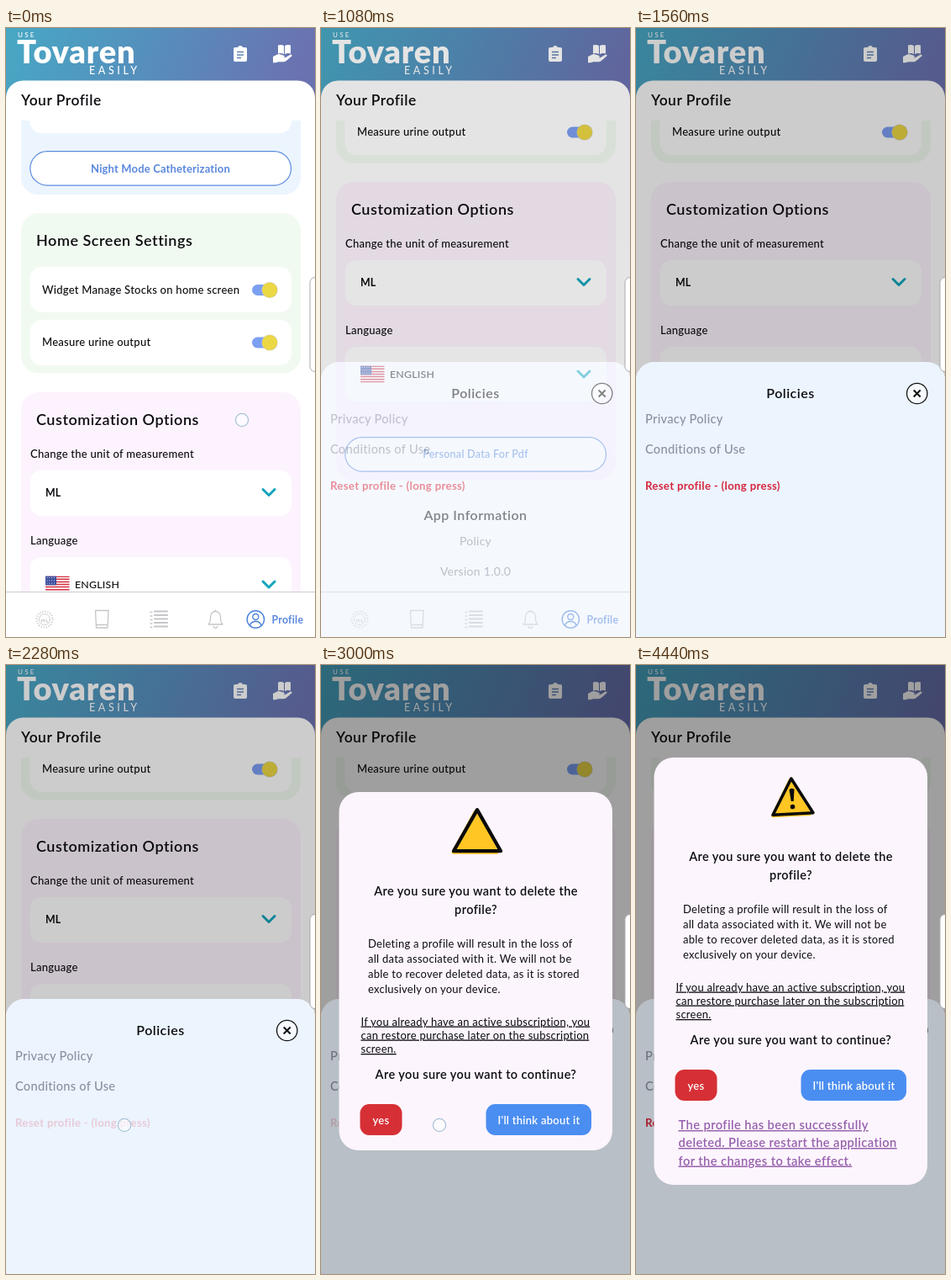
An HTML page that plays this animation: 368 px wide and 724 px high, repeating every 4.56 s.

```html
<!DOCTYPE html>
<html lang="en">
<head>
<meta charset="utf-8">
<title>Profile settings</title>
<style>
html, body { margin: 0; width: 100%; height: 100%; overflow: hidden; background: #fff; }
svg { display: block; width: 368px; height: 724px; }
text { font-family: Lato, "DejaVu Sans", sans-serif; font-size: 13px; font-weight: 500; letter-spacing: .02em; fill: #0c0c10; }
.mid { text-anchor: middle; }
.h1 { font-size: 17.4px; font-weight: 600; letter-spacing: .03em; }
.h2 { font-size: 18px; font-weight: 600; letter-spacing: .03em; }
.h3 { font-size: 16px; font-weight: 600; letter-spacing: .03em; }
.ask { font-size: 14.5px; font-weight: 600; letter-spacing: .028em; }
.grey { font-size: 14px; font-weight: 400; fill: #85858c; }
.item { font-size: 14.6px; fill: #8a90a0; }
.small { font-size: 12.3px; }
.bold { font-weight: 600; }
.heavy { font-weight: 700; }
.blue { fill: #5a88dd; }
.white { fill: #fff; }
.body { font-weight: 400; }
.link { font-weight: 400; text-decoration: underline; }
.done { font-size: 14.7px; font-weight: 600; letter-spacing: .028em; fill: #9560ab; text-decoration: underline; }
.reset { font-size: 13.2px; font-weight: 700; letter-spacing: .025em; fill: #d5263d; }
.line { fill: none; stroke: #c6c6ca; stroke-width: 1.3; stroke-linecap: round; stroke-linejoin: round; }
.outline { fill: #fff; stroke: #5a8bdc; stroke-width: 1.2; }
</style>
</head>
<body>
<svg viewBox="0 0 368 724">
  <defs>
    <linearGradient id="sky" x2="1" y2=".12">
      <stop offset="0" stop-color="#47a8c4"/>
      <stop offset=".5" stop-color="#568ebc"/>
      <stop offset="1" stop-color="#6b72b0"/>
    </linearGradient>
    <clipPath id="view"><rect y="110" width="368" height="560"/></clipPath>
    <clipPath id="flagBox"><rect x="47" y="651.5" width="28.5" height="20"/></clipPath>
    <g id="toggle">
      <rect x="-21" y="-6.5" width="27" height="13" rx="6.5" fill="#7c9ff2"/>
      <circle r="9.6" fill="#cdcbb8"/>
      <circle r="9" fill="#ecd744"/>
    </g>
    <path id="chevron" d="M-7-3.5 0 3.5 7-3.5" fill="none" stroke="#12a5bb" stroke-width="3" stroke-linecap="round" stroke-linejoin="round"/>
  </defs>

  <!-- header -->
  <rect width="368" height="110" fill="url(#sky)"/>
  <text class="white" x="14" y="10.5" style="font-size:8px;letter-spacing:2.3px">USE</text>
  <text class="white" x="13" y="42" style="font-size:38px;font-weight:900;letter-spacing:.02em">Tovaren</text>
  <text class="white" x="99" y="55" style="font-size:12.5px;letter-spacing:3.6px">EASILY</text>
  <g fill="#fff">
    <path d="M273 23h3a3.2 3.2 0 0 1 6 0h3a2 2 0 0 1 2 2v13a2 2 0 0 1-2 2h-12a2 2 0 0 1-2-2v-13a2 2 0 0 1 2-2Z"/>
    <path d="M275 28.5h8M275 32h8M275 35.5h5" stroke="#6383b5" stroke-width="1.5"/>
    <path d="M324 20.5q4-1.500 7 .7v10q-3-2-7-.7ZM332 21.200q3-2.200 7-.7v10q-4-1.300-7 .7Z"/>
    <path d="M318 34l5-2.500q2-1 4 0l4 1.200q2 1.500-.5 2.500h-4 6l6-3.500q2.500-.5 2 1.500l-7 6q-1.500 1-3 1h-6l-3.500 1h-3Z"/>
  </g>

  <path d="M0 724V83A20.500 20.500 0 0 1 20.500 62.500H347.500A20.500 20.500 0 0 1 368 83V724Z" fill="#fff"/>
  <text class="h1" x="18" y="91.500">Your Profile</text>

  <g clip-path="url(#view)"><g id="list">
    <rect x="18" y="40" width="333" height="158" rx="20" fill="#ecf5fe"/>
    <rect x="28.500" y="70" width="311.500" height="55" rx="14" fill="#fff"/>
    <rect class="outline" x="28.800" y="146.700" width="310.700" height="40.400" rx="20.200"/>
    <text class="mid heavy blue" x="184" y="171.500" style="letter-spacing:.012em">Night Mode Catheterization</text>

    <rect x="18" y="220" width="333" height="190.500" rx="21" fill="#f1faf0"/>
    <text class="h2" x="36" y="259">Home Screen Settings</text>
    <rect x="28.500" y="284" width="311.500" height="54" rx="14" fill="#fff"/>
    <rect x="28.500" y="347" width="311.500" height="54" rx="14" fill="#fff"/>
    <text x="43" y="315.500">Widget Manage Stocks on home screen</text>
    <text x="43" y="378">Measure urine output</text>
    <use href="#toggle" x="314" y="311.500"/>
    <use href="#toggle" x="314" y="374"/>

    <rect x="18" y="433" width="333" height="354.500" rx="21" fill="#fdf3fe"/>
    <text class="h2" x="36" y="472">Customization Options</text>
    <text x="29" y="510.500">Change the unit of measurement</text>
    <rect x="28.500" y="526" width="311.500" height="54" rx="14" fill="#fff"/>
    <text class="small heavy" x="47" y="557">ML</text>
    <use href="#chevron" x="313" y="552"/>
    <text x="29" y="614">Language</text>
    <rect x="28.500" y="629" width="311.500" height="65" rx="14" fill="#fff"/>
    <g clip-path="url(#flagBox)">
      <rect x="47" y="651.500" width="28.500" height="20" fill="#fff"/>
      <path id="stripes" stroke="#d22f3f" stroke-width="1.540"/>
      <rect x="47" y="651.500" width="13" height="10.800" fill="#3c4f9c"/>
      <path d="M48.500 653.500h11M48.500 656.800h11M48.500 660.100h11" stroke="#dfe4f5" stroke-width="1" stroke-dasharray="1 1.800"/>
    </g>
    <text class="small" x="82" y="666">ENGLISH</text>
    <use href="#chevron" x="313" y="661.500"/>
    <rect class="outline" x="28.800" y="736.700" width="310.700" height="40.400" rx="20.200"/>
    <text class="mid blue" x="184" y="761" style="font-size:12.6px">Personal Data For Pdf</text>

    <text class="mid h3" x="184" y="835">App Information</text>
    <text id="policy" class="mid grey" x="184" y="865">Policy</text>
    <text class="mid grey" x="184" y="901">Version 1.0.0</text>
  </g></g>

  <!-- tab bar -->
  <path d="M0 670.500H368" stroke="#cbcbcb"/>
  <g class="line">
    <circle cx="46" cy="703" r="9.500" stroke-width="2.200" stroke-dasharray="1 2" stroke-linecap="butt"/>
    <circle cx="46" cy="703" r="6.500" stroke-width=".8"/>
    <path d="M42.500 706v-3l1.500 1.500 1.500-1.500v3M48 703v3h2" stroke-width="1"/>
    <path d="M106.500 692.500h15.500l-1 20.500h-13.500ZM108 709.500h12" />
    <path d="M177 693.500h15M177 698h15M177 702.500h15M177 707h15M177 711.500h15" stroke-width="2.200"/>
    <path d="M172 694.500h2M172 699h2M172 703.500h2M172 708h2M172 712.500h2"/>
    <path d="M241 709q2.500-2.500 2.500-6v-3a6 6.500 0 0 1 12 0v3q0 3.500 2.500 6ZM247 711.500a2.600 2.600 0 0 0 5 0M249.500 693.500v-1.500"/>
  </g>
  <g fill="none" stroke="#4b82d8" stroke-width="1.400">
    <circle cx="297.300" cy="703" r="10.200"/>
    <circle cx="297.300" cy="700" r="3.500"/>
    <path d="M290.600 710q1.500-4.500 6.700-4.500t6.700 4.500"/>
  </g>
  <text class="small heavy blue" x="316.500" y="707.500">Profile</text>

  <!-- bottom sheet; the shade leaves the sheet itself free -->
  <g id="sheet">
    <path d="M0 0H368V419A22 22 0 0 0 346 397H22A22 22 0 0 0 0 419Z" fill="#000" fill-opacity=".2"/>
    <path d="M0 724V419A22 22 0 0 1 22 397H346A22 22 0 0 1 368 419V724Z" fill="#ecf4fe"/>
    <text class="mid h3" x="184" y="440">Policies</text>
    <circle cx="334.700" cy="434.500" r="12.200" fill="#fff" fill-opacity=".5" stroke="#111" stroke-width="1.300"/>
    <path d="M330.700 430.500l8 8M338.700 430.500l-8 8" stroke="#111" stroke-width="2"/>
    <text class="item" x="11" y="470">Privacy Policy</text>
    <text class="item" x="11" y="506">Conditions of Use</text>
    <text id="reset" class="reset" x="11" y="549">Reset profile - (long press)</text>
  </g>

  <!-- dialog -->
  <g id="dialog">
    <rect width="368" height="724" fill="#000" fill-opacity=".22"/>
    <rect id="card" x="21.500" width="325.500" rx="23" fill="#fdf5fe"/>
    <g id="parts">
      <g id="icon">
        <path d="M186 176 162 218H210Z" fill="#fff"/>
        <path d="M184.500 178 162 219H206Z" fill="#ffc624" stroke="#ffc624" stroke-width="4" stroke-linejoin="round"/>
        <path d="M186 176 162 218H210Z" fill="none" stroke="#0a0a0a" stroke-width="3.600" stroke-linejoin="round"/>
        <g id="mark">
          <path d="M183 189q3-2.600 6 0l-1.500 14h-3Z" fill="#0a0a0a"/>
          <circle cx="186" cy="209.500" r="2.800" fill="#0a0a0a"/>
        </g>
      </g>
      <text class="mid ask" x="184.500" y="274">Are you sure you want to delete the</text>
      <text class="mid ask" x="184.500" y="295.500">profile?</text>
      <text class="body" x="56" y="336">Deleting a profile will result in the loss of</text>
      <text class="body" x="56" y="354">all data associated with it. We will not be</text>
      <text class="body" x="56" y="372">able to recover deleted data, as it is stored</text>
      <text class="body" x="56" y="390">exclusively on your device.</text>
      <text class="link" x="47.500" y="428.500">If you already have an active subscription, you</text>
      <text class="link" x="47.500" y="444.500">can restore purchase later on the subscription</text>
      <text class="link" x="47.500" y="461">screen.</text>
      <text class="mid ask" x="184.500" y="491.500">Are you sure you want to continue?</text>
      <g id="yes">
        <rect x="46.500" y="522" width="50" height="37" rx="11" fill="#d63036"/>
        <text class="mid bold white" x="71.500" y="545.500">yes</text>
      </g>
      <rect x="196.500" y="522" width="125.500" height="37" rx="11" fill="#4b8ef1"/>
      <text class="mid bold white" x="259.500" y="545.500">I'll think about it</text>
      <g id="done">
        <text class="done" x="50.500" y="593">The profile has been successfully</text>
        <text class="done" x="50.500" y="614">deleted. Please restart the application</text>
        <text class="done" x="50.500" y="635.500">for the changes to take effect.</text>
      </g>
    </g>
  </g>

  <rect x="362" y="296.500" width="14" height="112" rx="6" fill="#fff" stroke="#a9a9ad"/>
  <circle id="touch" r="7.600" fill="#fff" fill-opacity=".6" stroke="#a9c4d6" stroke-width="1.300"/>
</svg>
<script>
const LOOP = 4560, STEP = 120;
const el = id => document.getElementById(id);
const set = (id, attrs) => {
  for (const k in attrs) el(id).setAttribute(k, attrs[k]);
};

// linear interpolation through [time, value] points
function key(t, pts) {
  if (t <= pts[0][0]) return pts[0][1];
  for (let i = 1; i < pts.length; i++) {
    const [t0, a] = pts[i - 1], [t1, b] = pts[i];
    if (t <= t1) return a + (b - a) * (t - t0) / (t1 - t0);
  }
  return pts[pts.length - 1][1];
}

const scroll = [[0, 0], [120, 70], [240, 195], [360, 250.5], [480, 250]];
const policyFade = [[600, 1], [720, .4], [840, .4], [960, 1]];
const sheetFade = [[840, 0], [960, .2], [1080, .52], [1200, .78], [1320, 1]];
const resetFade = [[1800, 1], [1920, .6], [2040, .2], [3120, .2], [3360, 1]];
const dialogFade = [[2760, 0], [2880, .55], [3000, 1]];
const yesFade = [[3840, 1], [3960, .85], [4080, .55], [4320, 1]];
const pop = [[2880, .6], [3000, 1.17], [3120, 1.08], [3240, .97], [3360, 1]];
const tilt = [[3360, 0], [3600, 4], [3840, -4], [4080, 0], [4440, -3]];
const markGrow = [[3000, 0], [3240, 1.1], [3360, 1]];

// start, end, x, y of each touch
const touches = [
  [0, 240, 281, 466],
  [720, 960, 184, 610],
  [1920, 3240, 141, 547],
  [3960, 4200, 80.5, 547]
];

function draw(ms) {
  const t = Math.floor(ms % LOOP / STEP) * STEP;
  const top = key(t, scroll);
  set("list", { transform: `translate(0 ${-top})` });
  set("policy", { opacity: key(t, policyFade) });
  set("sheet", { opacity: key(t, sheetFade) });
  set("reset", { opacity: key(t, resetFade) });
  set("dialog", { opacity: key(t, dialogFade) });
  set("yes", { opacity: key(t, yesFade) });

  const done = t >= 4440;
  set("card", { y: done ? 110 : 151, height: done ? 508 : 426 });
  set("parts", { transform: `translate(0 ${done ? -41 : 0})` });
  set("done", { opacity: done ? 1 : 0 });
  set("icon", { transform: `translate(186 199) rotate(${key(t, tilt)}) scale(${key(t, pop)}) translate(-186 -199)` });
  set("mark", { transform: `translate(186 200) scale(${key(t, markGrow)}) translate(-186 -200)` });

  const tap = touches.find(([a, b]) => t >= a && t < b);
  set("touch", { opacity: tap ? 1 : 0 });
  if (tap) set("touch", { cx: tap[2], cy: tap[3] - (t < 600 ? top : 0) });
}

let bars = "";
for (let i = 0; i < 13; i += 2) bars += `M47 ${652.27 + i * 1.54}h29`;
set("stripes", { d: bars });

const start = performance.now();
function tick() {
  draw(performance.now() - start);
  requestAnimationFrame(tick);
}
draw(0);
requestAnimationFrame(tick);
</script>
</body>
</html>
```
